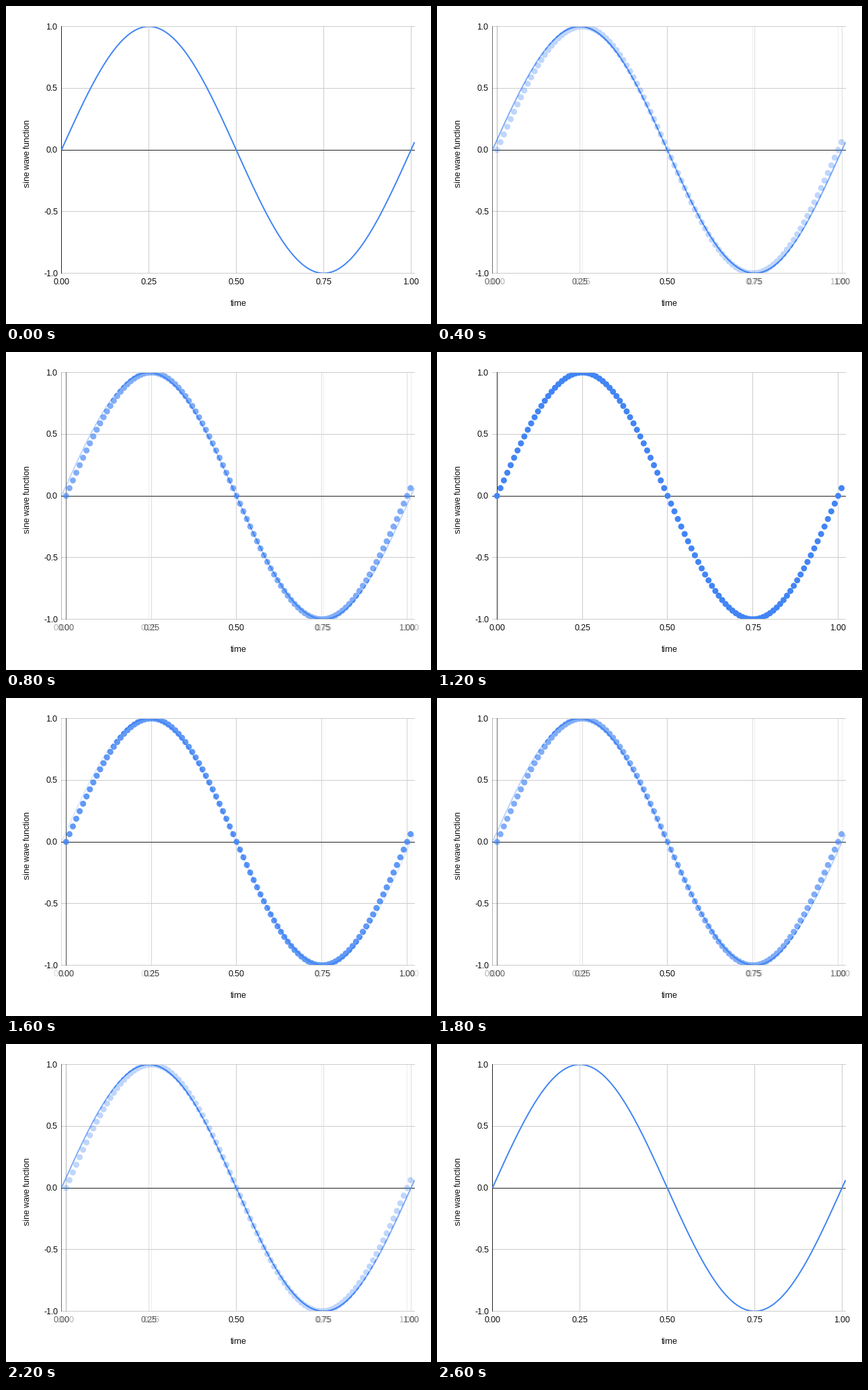
A matplotlib script that plays this animation: 632x473 px, repeating every 2.8 s.

```python
import matplotlib.pyplot as plt
import numpy as np
from matplotlib.animation import FuncAnimation
from matplotlib.path import Path
from matplotlib.patches import PathPatch
from matplotlib.transforms import Bbox, TransformedBbox

WIDTH, HEIGHT, DPI = 632, 473, 64
PX = 72 / DPI  # points per pixel
LEFT, RIGHT, TOP, BOTTOM = 82, 608, 30, 397
BLUE, GRID, AXIS, INK = "#4285f4", "#cccccc", "#222222", "#000000"
FRAMES, INTERVAL, STEPS = 14, 200, 6

plt.rcParams.update({
    "font.family": "Liberation Sans",
    "font.size": 12 * PX,
    "text.hinting": "native",
    "text.hinting_factor": 1,
})

fig = plt.figure(figsize=(WIDTH / DPI, HEIGHT / DPI), dpi=DPI, facecolor="white")
ax = fig.add_axes([0, 0, 1, 1])
ax.set(xlim=(0, WIDTH), ylim=(HEIGHT, 0))
ax.axis("off")
plot_box = TransformedBbox(Bbox([[LEFT, TOP + 1], [RIGHT, BOTTOM]]), ax.transData)


def line_x(t):
    return LEFT + 0.5 + 519.8 * t


def dots_x(t):
    return 89.3 + 507.2 * t


def value_y(v):
    return TOP + 0.5 + (1 - v) * (BOTTOM - TOP) / 2


def rule(xs, ys, color, zorder):
    return ax.plot(xs, ys, color=color, lw=PX, zorder=zorder,
                   solid_capstyle="butt", snap=False)[0]


def label(x, y, text, ha="center", **kwargs):
    return ax.text(x, y, text, color=INK, ha=ha, va="baseline", **kwargs)


def time_tick(to_x, t):
    x = to_x(t)
    color, zorder = (AXIS, 2.5) if t == 0 else (GRID, 1)
    column = np.floor(x) + 0.5
    return [rule([column] * 2, [TOP, BOTTOM + 1], color, zorder),
            label(x + 0.5, 414, f"{t:.2f}")]


def add_curve(zorder):
    t = np.linspace(0, 1.01, 400)
    curve, = ax.plot(line_x(t), value_y(np.sin(2 * np.pi * t)), color=BLUE,
                     lw=2 * PX, zorder=zorder, solid_capstyle="butt")
    curve.set_clip_box(plot_box)
    return curve


for v in (1, 0.5, 0, -0.5, -1):
    y = value_y(v)
    rule([LEFT, RIGHT], [np.floor(y) + 0.5] * 2, AXIS if v == 0 else GRID,
         2 if v == 0 else 1)
    label(77, y + 4.2, f"{v:.1f}", ha="right")
label(346, 446, "time")
label(35, 220, "sine wave function", rotation=90, rotation_mode="anchor")

# The middle tick is common to both charts and never fades.
time_tick(line_x, 0.5)
line_parts, dot_parts = [], []
for t in (0, 0.25, 0.75, 1):
    line_parts += time_tick(line_x, t)
    dot_parts += time_tick(dots_x, t)

samples = np.arange(102) / 100
centers = zip(dots_x(samples), value_y(np.sin(2 * np.pi * samples)))
dots_path = Path.make_compound_path(*[Path.circle(c, 4.5) for c in centers])
dots = ax.add_patch(PathPatch(dots_path, fc=BLUE, ec="none", lw=0, zorder=3))
dots.set_clip_box(plot_box)
dot_parts.append(dots)
line_parts.append(add_curve(4))

# Where curve and dots coincide, the crossfade stays fully blue.
overlap = add_curve(5)
overlap.set_clip_path(dots_path, ax.transData)


def update(frame):
    mix = min(frame, STEPS, FRAMES - 1 - frame) / STEPS
    for part in line_parts:
        part.set_alpha(1 - mix)
    for part in dot_parts:
        part.set_alpha(mix)
    overlap.set_visible(0 < mix < 1)
    return [*line_parts, *dot_parts, overlap]


anim = FuncAnimation(fig, update, frames=FRAMES, interval=INTERVAL, repeat=True)
plt.show()
```
